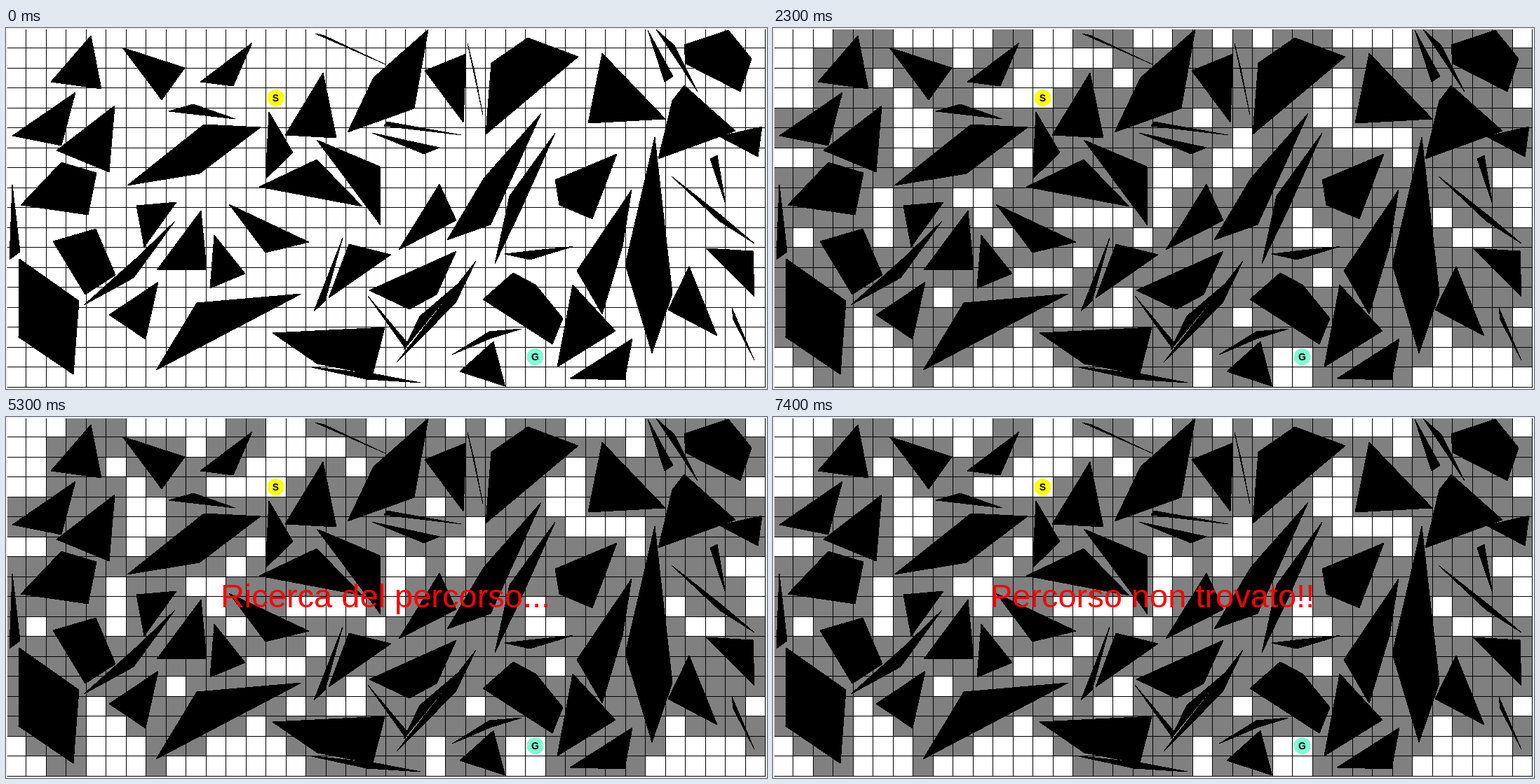
Animation, 1085 px wide and 516 px high, one loop 8 s. Source, as an HTML page:

```html
<!DOCTYPE html>
<html lang="it">
<head>
<meta charset="utf-8">
<title>Ricerca del percorso</title>
<style>
  html, body { margin: 0; width: 100%; height: 100%; overflow: hidden; background: #f0f0f0; }
  svg { display: block; shape-rendering: crispEdges; }
  polygon { stroke: #000; stroke-linejoin: round; }
  text { font-family: "Liberation Sans", Arial, sans-serif; text-anchor: middle; }
  #message { font-size: 47px; fill: #f00; }
  .label { font-size: 14px; font-weight: bold; }
</style>
</head>
<body>
<svg width="1085" height="516">
  <rect x="2" y="2" width="1081" height="512" fill="#fff"/>
  <path id="blocked" fill="#808080"/>
  <path id="grid"/>
  <g id="obstacles">
    <polygon points="121,11 64,77 136,87"/>
    <polygon points="166,28 255,57 222,103"/>
    <polygon points="351,21 277,77 324,83"/>
    <polygon points="99,92 9,154 79,168"/>
    <polygon points="155,111 72,175 147,206"/>
    <polygon points="232,119 267,109 327,130"/>
    <polygon points="282,138 363,142 276,208 173,225"/>
    <polygon points="375,120 409,178 370,216"/>
    <polygon points="452,64 398,153 471,157"/>
    <polygon points="441,8 454,11 541,52"/>
    <polygon points="602,2 582,115 487,149 524,71"/>
    <polygon points="656,37 652,135 597,61"/>
    <polygon points="658,22 667,58 680,124"/>
    <polygon points="744,14 816,41 684,152 692,50"/>
    <polygon points="543,134 649,153 539,140"/>
    <polygon points="522,150 618,171 596,180"/>
    <polygon points="850,36 940,130 830,136"/>
    <polygon points="915,3 951,69 939,77"/>
    <polygon points="927,2 953,25 986,91"/>
    <polygon points="967,24 1030,3 1063,44 1047,91 969,51"/>
    <polygon points="967,82 1040,147 930,187 950,104"/>
    <polygon points="1078,141 1072,184 1017,155"/>
    <polygon points="1014,182 1026,252 1004,187"/>
    <polygon points="949,212 1021,269 1067,308 1017,276"/>
    <polygon points="998,315 1065,319 1067,384"/>
    <polygon points="1035,400 1041,414 1067,475 1037,417"/>
    <polygon points="974,341 1014,440 944,403"/>
    <polygon points="925,156 950,380 921,465 883,338"/>
    <polygon points="892,231 879,312 850,409 814,347"/>
    <polygon points="871,180 836,273 789,253 783,217"/>
    <polygon points="763,122 691,281 629,303 681,215"/>
    <polygon points="783,150 733,262 697,337 718,240"/>
    <polygon points="618,223 642,275 560,317"/>
    <polygon points="443,160 533,198 534,282"/>
    <polygon points="443,188 508,255 361,227"/>
    <polygon points="318,252 432,306 370,321"/>
    <polygon points="711,323 754,318 808,312.5 747,331"/>
    <polygon points="79,192 129,207 117,267 21,253"/>
    <polygon points="9,224 20,320 5,331"/>
    <polygon points="67,305 128,287 156,353 113,381"/>
    <polygon points="19,330 104,390 96,495 18,442"/>
    <polygon points="186,254 243,249 197,313"/>
    <polygon points="241,276 182,357 111,396 187,328"/>
    <polygon points="278,261 286,345 215,346"/>
    <polygon points="297,296 341,351 291,372"/>
    <polygon points="217,363 199,445 147,410"/>
    <polygon points="421,380 214,489 272,393"/>
    <polygon points="489,309 549,324 460,386"/>
    <polygon points="480,300 455,390 439,405"/>
    <polygon points="642,319 614,381 575,402 518,375"/>
    <polygon points="516,383 573,451 568,456"/>
    <polygon points="670,333 641,393 557,478"/>
    <polygon points="644,366 590,412 567,460"/>
    <polygon points="723,350 755,367 794,415 779,452 680,388"/>
    <polygon points="808,367 869,433 786,484.5"/>
    <polygon points="893,444 882,503 804,501"/>
    <polygon points="636,467 689,434 735,430 690,444"/>
    <polygon points="695,448 711.5,512 647,491"/>
    <polygon points="380,436 540,428 523,495 444,480"/>
    <polygon points="431,484 523,494 591,507 514,502"/>
  </g>
  <circle cx="384.5" cy="100" r="12" fill="#ff0"/>
  <text class="label" x="384.5" y="105">S</text>
  <circle cx="754.5" cy="470" r="12" fill="#7fffd4"/>
  <text class="label" x="754.5" y="475">G</text>
  <text id="message" x="541" y="272"></text>
  <rect x="1" y="1" width="1083" height="514" fill="none" stroke="#f0f0f0" stroke-width="2"/>
</svg>
<script>
const COLS = 38, ROWS = 18, STEP = 1082 / COLS, LOOP = 8000;
const byId = id => document.getElementById(id);
const line = k => Math.round(k * STEP);
const box = (x, y, w, h) => `M${x} ${y}h${w}v${h}h${-w}z`;

function gridPath() {
  let d = "";
  for (let c = 1; c <= COLS; c++) d += box(line(c), 2, 1, line(ROWS) - 1);
  for (let r = 1; r <= ROWS; r++) d += box(2, line(r), line(COLS) - 1, 1);
  return d;
}

// A cell is blocked when an obstacle edge runs through it; cells inside are black anyway.
function blockedPath() {
  const cells = new Set();
  for (const { points } of document.querySelectorAll("polygon")) {
    const corners = [...points];
    corners.forEach((a, i) => {
      const b = corners[(i + 1) % corners.length];
      const n = Math.ceil(Math.hypot(b.x - a.x, b.y - a.y) * 4);
      for (let k = 0; k <= n; k++) {
        const c = Math.floor((a.x + (b.x - a.x) * k / n) / STEP);
        const r = Math.floor((a.y + (b.y - a.y) * k / n) / STEP);
        if (c < COLS && r < ROWS) cells.add(r * COLS + c);
      }
    });
  }
  return [...cells].map(i => {
    const c = i % COLS, r = Math.floor(i / COLS);
    return box(line(c), line(r), line(c + 1) - line(c), line(r + 1) - line(r));
  }).join("");
}

byId("grid").setAttribute("d", gridPath());
byId("blocked").setAttribute("d", blockedPath());

const start = performance.now();
function draw() {
  const t = (performance.now() - start) % LOOP;
  byId("blocked").style.display = t < 500 ? "none" : "";
  byId("message").textContent =
    t < 3500 ? "" : t < 6500 ? "Ricerca del percorso..." : "Percorso non trovato!!";
  requestAnimationFrame(draw);
}
draw();
</script>
</body>
</html>
```
